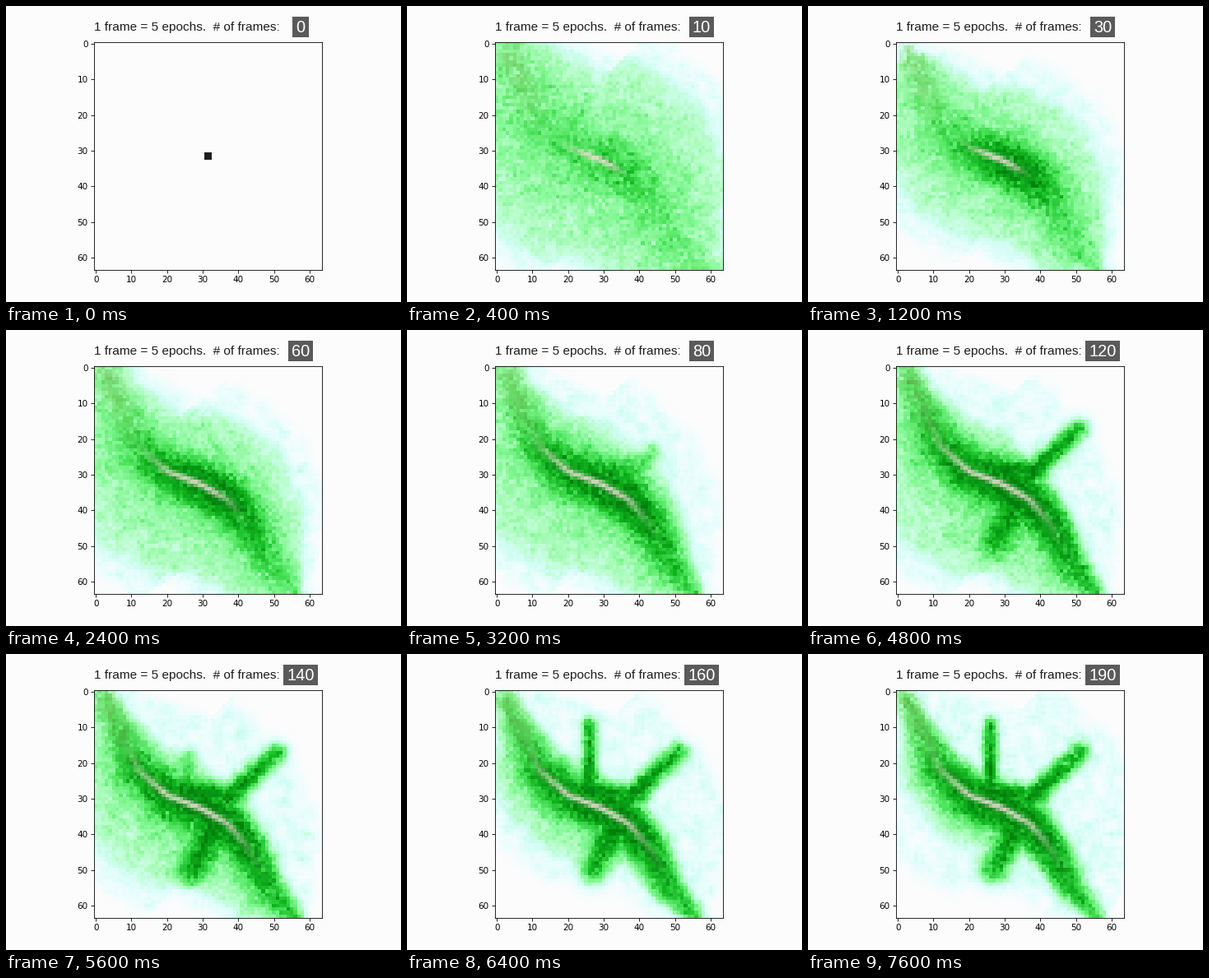
Recreate the animation shown at these times as a matplotlib script. Size 480 px wide and 360 px high, loop 8000 ms.

```python
import numpy as np
import matplotlib.pyplot as plt
from matplotlib.animation import FuncAnimation
from matplotlib.colors import LinearSegmentedColormap
from matplotlib.patches import Rectangle

SIZE, STEPS, INTERVAL = 64, 20, 400
WIDTH, HEIGHT = 480, 360
BACK = "#fcfcfc"
SPINE = [(3, 2), (8, 13), (12, 22), (20, 29), (30, 33),
         (37, 37), (43, 44), (49, 55), (57, 64)]
SHADES = LinearSegmentedColormap.from_list("growth", [
    (0, BACK), (.1, "#e6fefc"), (.18, "#d2fdf4"), (.28, "#b8fdca"),
    (.4, "#86f896"), (.55, "#4ce45c"), (.75, "#10b41e"), (1, "#00800c")])
CREAM = np.array([232, 222, 208]) / 255
OLIVE = np.array([160, 190, 120]) / 255

yy, xx = np.mgrid[:SIZE, :SIZE].astype(float)


def fade(value, start, end):
    """Smooth step from 0 at start to 1 at end."""
    t = np.clip((value - start) / (end - start), 0, 1)
    return t * t * (3 - 2 * t)


def bell(value, width, power=2):
    return np.exp(-np.abs(value / width) ** power)


def segment(a, b):
    """Distance of each cell to a segment, position along it, and side."""
    dx, dy = b[0] - a[0], b[1] - a[1]
    px, py = xx - a[0], yy - a[1]
    t = np.clip((px * dx + py * dy) / (dx * dx + dy * dy), 0, 1)
    return np.hypot(px - t * dx, py - t * dy), t, px * dy - py * dx > 0


def spine_field():
    dist, place = np.full(xx.shape, 99.0), np.zeros(xx.shape)
    right = np.zeros(xx.shape, bool)
    for i, (a, b) in enumerate(zip(SPINE, SPINE[1:])):
        d, t, side = segment(a, b)
        closer = d < dist
        place = np.where(closer, (i + t) / (len(SPINE) - 1), place)
        right = np.where(closer, side, right)
        dist = np.minimum(d, dist)
    return dist, place, right


dist, place, on_right = spine_field()
bulge = np.clip(np.sin(np.pi * place), 0, 1) ** .6
rear = fade(place, .4, .6)


def reaches(n):
    """How far the green body and its pale halo extend from the spine."""
    shrink = fade(n, 125, 175)
    right = 23 - 6 * fade(n, 50, 100) - 8 * fade(n, 110, 190)
    right = right * (1 - .5 * rear * fade(n, 60, 100))
    left = 26 + 5 * fade(n, 50, 60) - 15 * shrink
    left = left * (1 - .5 * rear * shrink)
    taper = np.maximum(bulge, .1 + .25 * (1 - place) * fade(n, 50, 60))
    body = np.where(on_right, right, left) * taper + 8 * (1 - fade(n, 10, 20))
    halo_right = 4 + 11 * fade(n, 60, 100) + 13 * fade(n, 125, 190)
    halo_left = 3 + 7 * fade(n, 160, 190)
    return body, body + 2 + np.where(on_right, halo_right, halo_left) * bulge


def limb(start, end, width, growth):
    tip = [s + (e - s) * max(growth, .05) for s, e in zip(start, end)]
    d, t, _ = segment(start, tip)
    return growth * (.95 - .25 * t) * bell(d, width)


def dark_parts(n):
    spread = .2 + .25 * fade(n, 20, 120)
    spine = .95 * bell(place - .55, spread) * fade(n, -10, 40)
    return np.maximum.reduce([
        spine * bell(dist, 2 + 4.5 * bulge, 2.5),
        limb((25, 28), (40, 29), 3.2, fade(n, 40, 100)),
        limb((37, 30), (51, 17), 3, fade(n, 60, 100)),
        limb((34, 37), (27, 50), 4.3, fade(n, 95, 125)),
        limb((26, 27), (26, 9), 2.1, fade(n, 120, 160))])


def soft_edge(depth, softness):
    return 1 / (1 + np.exp(-np.clip(depth / softness, -30, 30)))


def clumped(noise):
    for axis in (0, 1):
        noise = (np.roll(noise, 1, axis) + noise + np.roll(noise, -1, axis)) / 3
    return 2 * noise


def tint(image, colour, amount):
    return image + (colour - image) * amount[..., None]


def cells(n):
    """Colours of the grid after n frames of training."""
    if n == 0:
        image = np.full((SIZE, SIZE, 3), 252 / 255)
        image[31:33, 31:33] = .125
        return image
    rng = np.random.default_rng(n)
    grain = rng.normal(0, 1, xx.shape)
    clumps = clumped(rng.normal(0, 1, xx.shape))

    body, halo = reaches(n)
    core = soft_edge(body - dist, 1.3)
    depth = np.clip(1 - dist / (body + 1), 0, 1)
    value = soft_edge(halo - dist, .9) * np.clip(.1 + .05 * clumps, 0, .2)
    value = np.maximum(value, core * (.22 + .25 * depth + .035 * clumps))
    value += (1 - value) * dark_parts(n)
    image = SHADES(np.clip(value * (1 + .1 * grain), 0, 1))[..., :3]

    olive = .5 * (1 - fade(place, 0, .35)) * bell(dist, 3.5) * core
    image = tint(image, OLIVE, olive * np.clip(.7 + .4 * grain, 0, 1))
    ridge = bell(place - .48, .1 + .15 * fade(n, 20, 100), 3)
    image = tint(image, CREAM, .9 * ridge * bell(dist, .95))
    return np.clip(image, 0, 1)


fig = plt.figure(figsize=(WIDTH / 75, HEIGHT / 75), dpi=75, facecolor=BACK)
ax = fig.add_axes([107 / WIDTH, 39 / HEIGHT, 277 / WIDTH, 277 / HEIGHT],
                  facecolor=BACK)
picture = ax.imshow(cells(0), interpolation="nearest")

points = 72 / fig.dpi
fig.text(107 / WIDTH, 1 - 30 / HEIGHT, "1 frame = 5 epochs.  # of frames:",
         family="Liberation Sans", size=15.4 * points, color="#1c1c1c")
badge = Rectangle((0, 0), 0, 0, transform=fig.transFigure,
                  facecolor="#5a5a5a", linewidth=0)
fig.add_artist(badge)
counter = fig.text(358 / WIDTH, 1 - 32.5 / HEIGHT, "", ha="center", zorder=5,
                   family="Liberation Sans", size=20 * points, color="white")


def draw(step):
    n = step * 10
    picture.set_data(cells(n))
    counter.set_text(str(n))
    wide = 8.3 + 11.2 * len(str(n))
    badge.set_bounds((358 - wide / 2) / WIDTH, 1 - 38 / HEIGHT,
                     wide / WIDTH, 25.5 / HEIGHT)
    return picture, badge, counter


anim = FuncAnimation(fig, draw, frames=STEPS, interval=INTERVAL,
                     repeat=True, repeat_delay=0)
plt.show()
```
